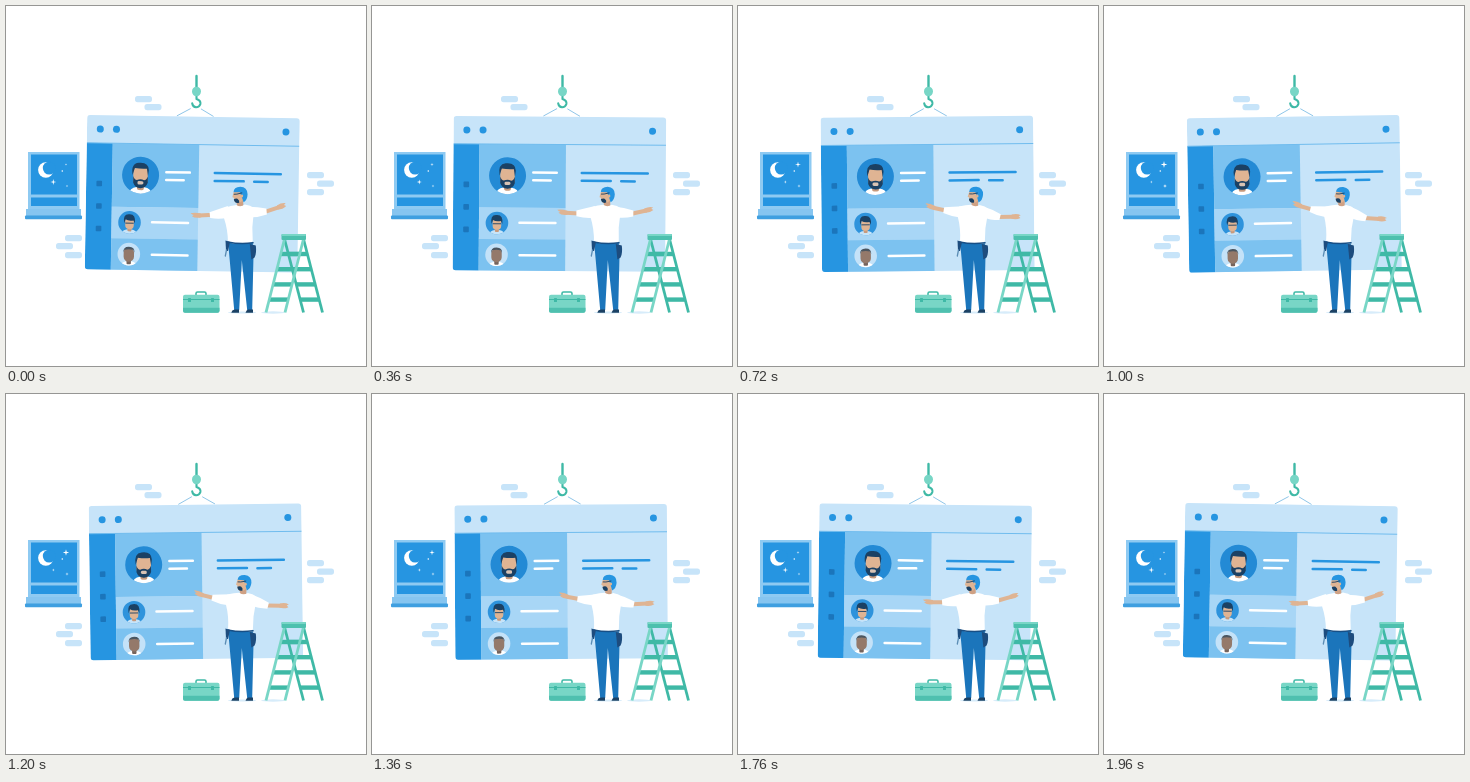
Write an HTML page with a canvas that moves like this. It is 360x360 px and loops after 2 s.

```html
<!DOCTYPE html>
<html lang="en">
<head>
<meta charset="utf-8">
<title>Building a page</title>
<style>
html, body { margin: 0; width: 100%; height: 100%; overflow: hidden; background: #fff; }
canvas { display: block; width: 360px; height: 360px; }
</style>
</head>
<body>
<canvas id="stage"></canvas>
<script>
const canvas = document.getElementById('stage');
const g = canvas.getContext('2d');
const dpr = window.devicePixelRatio || 1;
canvas.width = canvas.height = 360 * dpr;

const LOOP = 2000, STEP = 40, DEG = Math.PI / 180;
const PALE = '#c7e4f9', SKY = '#7cc2f0', SOFT = '#a8d6f6', BLUE = '#2695e1', DEEP = '#1b75bb',
  NAVY = '#1b4164', SKIN = '#dfb493', TEAL = '#3fb9a6', MINT = '#78d6c6', WHITE = '#fff';

function box(x, y, w, h, color, r = 0) {
  g.fillStyle = color;
  g.beginPath();
  g.roundRect(x, y, w, h, r);
  g.fill();
}

function oval(x, y, rx, color, ry = rx) {
  g.fillStyle = color;
  g.beginPath();
  g.ellipse(x, y, rx, ry, 0, 0, 7);
  g.fill();
}

function shape(path, color) {
  g.fillStyle = color;
  g.fill(new Path2D(path));
}

function stroke(path, color, width, cap = 'round') {
  g.strokeStyle = color;
  g.lineWidth = width;
  g.lineCap = cap;
  g.lineJoin = 'round';
  g.stroke(new Path2D(path));
}

function bar(x1, x2, y, color, width = 2.5) {
  stroke(`M${x1 + 1} ${y}H${x2 - 1}`, color, width);
}

function turned(x, y, deg, draw) {
  g.save();
  g.translate(x, y);
  g.rotate(deg * DEG);
  g.translate(-x, -y);
  draw();
  g.restore();
}

function inCircle(x, y, r, color, draw) {
  oval(x, y, r, color);
  g.save();
  g.beginPath();
  g.arc(x, y, r, 0, 7);
  g.clip();
  g.translate(x, y);
  draw();
  g.restore();
}

function bricks() {
  const spots = [[129, 90], [138.5, 98], [301, 166], [311, 174.5], [301, 183], [59, 229], [50, 237], [59, 246]];
  for (const [x, y] of spots) box(x, y, 17, 6.2, PALE, 2.6);
}

function star(x, y, r) {
  const k = r * 0.2;
  shape(`M${x} ${y - r}L${x + k} ${y - k}L${x + r} ${y}L${x + k} ${y + k}L${x} ${y + r}` +
    `L${x - k} ${y + k}L${x - r} ${y}L${x - k} ${y - k}Z`, WHITE);
}

function nightWindow(swing) {
  box(22, 146, 51.5, 58, '#8ecaf2');
  box(25, 148.5, 46, 40, BLUE);
  box(25, 191.5, 46, 8.5, BLUE);
  box(20, 203, 55, 7, '#86c5f0');
  box(19, 209.5, 57, 3.7, '#3f9fe0', 1);
  oval(39.8, 164, 7.7, WHITE);
  oval(43.2, 162.1, 6.4, BLUE);
  star(60, 158.5, 2.3 - 1.1 * swing);
  star(47.3, 176, 2.2 + 0.8 * swing);
  star(61, 180, 1.6 - 0.3 * swing);
  oval(56.3, 165, 0.8, WHITE);
}

function bearded() {
  shape('M-12 20Q-11 13 -4 12H4Q11 13 12 20Z', WHITE);
  box(-3.5, 7, 7, 8, '#c79a7d', 2);
  box(-7.3, -9.5, 14.6, 20, SKIN, 6);
  shape('M-7.3 1Q-6 4.8 -3.6 5Q0 3.4 3.6 5Q6 4.8 7.3 1V7.5Q5.5 13 0 13Q-5.5 13 -7.3 7.5Z', NAVY);
  box(-3, 6, 6, 3.4, '#d9c3b4', 1.5);
  shape('M-8 0Q-10 -11.5 -2 -12.3Q8 -13.5 8.2 -5L7.4 1L6.3 -6.5Q0 -6 -5.8 -7Z', NAVY);
}

function spectacled() {
  shape('M-8 12Q-7 7.5 -2 7H2Q7 7.5 8 12Z', PALE);
  box(-2, 4, 4, 5, '#c79a7d', 1);
  box(-4.3, -5, 8.6, 11.8, SKIN, 4);
  shape('M-5.4 1Q-7 -8 -1 -8Q6.5 -9 5.4 1L4 -2Q-1 -1 -4 -3Z', NAVY);
  stroke('M-3.8 .8H3.8', NAVY, 0.9);
}

function cropped() {
  shape('M-9 12Q-7 7.5 -2 7H2Q7 7.5 9 12Z', WHITE);
  box(-2.2, 3, 4.4, 7, '#75645d', 1);
  box(-5.2, -6.5, 10.4, 14, '#94796a', 5);
  shape('M-5.5 -1.5Q-6 -7.3 0 -7.3Q6 -7.3 5.5 -1.5L4.4 -4.4Q0 -5.4 -4.4 -4.4Z', '#4b5660');
}

function hook() {
  stroke('M190.5 70V82', TEAL, 2.4);
  stroke('M190.5 88V93Q194.9 94.3 194.4 98Q193.2 101.4 190 101.3Q186.8 101 186.2 97.3', TEAL, 2.1);
  oval(190.5, 85.5, 4.5, MINT, 4.8);
}

function board() {
  stroke('M172 110L185 102.8M196 103L208 110', '#83bfe6', 0.9);
  g.save();
  g.beginPath();
  g.roundRect(82, 110.7, 212.5, 154.3, 3);
  g.clip();
  box(82, 110, 213, 156, PALE);
  box(82, 138.5, 26, 127, BLUE);
  box(108, 138.5, 86.5, 63.5, SKY);
  box(108, 202, 86.5, 31.5, SOFT);
  box(108, 233.5, 86.5, 32, SKY);
  box(82, 138, 213, 1, '#70bcee');
  g.restore();

  for (const x of [95.3, 111.5, 281]) oval(x, 124.6, 3.5, BLUE);
  for (const y of [179, 201.5, 224]) box(92.3, y - 2.8, 5.6, 5.6, DEEP, 0.8);

  inCircle(136.3, 170, 18.5, '#238ad5', bearded);
  inCircle(126, 217.4, 11.3, '#2e93dc', spectacled);
  inCircle(125.8, 249.2, 11.3, '#c4e2f8', cropped);

  bar(161, 186.5, 166.7, WHITE);
  bar(161, 180.5, 174.5, WHITE);
  bar(147.5, 185.5, 217, WHITE);
  bar(147.8, 185.5, 249.5, WHITE);
  bar(209.5, 277.5, 166.8, BLUE);
  bar(209.5, 240.5, 174.6, BLUE);
  bar(249, 264.5, 174.9, BLUE);
}

function toolbox() {
  stroke('M190 289V287.5Q190 286 191.5 286H198.5Q200 286 200 287.5V289', TEAL, 1.6);
  box(177, 288.7, 36.5, 18, MINT, 2);
  box(177, 301.8, 36.5, 4.9, '#4fc0af', [0, 0, 2, 2]);
  box(177, 293, 36.5, 1, TEAL);
  for (const x of [182, 205]) box(x, 292, 3, 4, TEAL, 0.5);
}

// One side of the ladder: two parallel legs that lean by `lean` at the floor.
function ladderSide(lean, legColor, rungColor) {
  for (let y = 248; y < 300; y += 15.2) {
    const x = 278.5 + lean * (y - 233) / 73;
    box(x, y - 2.2, 19, 4.4, rungColor);
  }
  for (const x of [278.5, 297.5]) stroke(`M${x} 233L${x + lean} 306.5`, legColor, 2.8, 'butt');
}

function ladder() {
  oval(267, 306.5, 12, '#d7ecfa', 1.2);
  ladderSide(19, TEAL, TEAL);
  ladderSide(-18.5, MINT, TEAL);
  box(275.5, 228, 24.5, 6, '#4dc0ae', 1);
  box(275.5, 228, 24.5, 2, MINT, 1);
}

function legs() {
  oval(236, 306.5, 14, '#d7ecfa', 1);
  shape('M222 235H246.5L247.6 246L246.2 304H241.2L235.8 254L233.2 304H228.2Z', DEEP);
  shape('M225.3 306.8Q225.8 304 228.5 303.5H233V306.8ZM239.5 306.8Q240.5 304 242 303.5H247V306.8Z', NAVY);
}

function belt() {
  stroke('M221.8 236Q234 238.6 247 236.8', '#174f86', 1.6);
  shape('M243.8 238L249.8 239.5Q250.8 247 248.6 251.5L245.4 253.5Z', '#1d4c7e');
  shape('M219.5 234.5L224 236L222 245H220Z', '#1d4c7e');
  stroke('M220.5 244L219.3 250', '#5b8db5', 1.3);
}

function leftArm() {
  stroke('M208 206.6L194 205.4', SKIN, 4, 'butt');
  shape('M196 203.4Q190 201.2 186 202Q187.5 203.8 189 204.2L187 205Q190 208 196 207.4Z', SKIN);
  shape('M224 200Q213 202 205 203.6L204.8 209.4Q214 212 222 211.5Z', WHITE);
}

function rightArm() {
  stroke('M260 209L275 207', SKIN, 4, 'butt');
  shape('M273 205Q278 203 282 204.5L280 205.8L282 207.2Q278 210 273 209Z', SKIN);
  shape('M243 200.3Q253 202 262 206L261.4 212Q252 213.2 245 211.5Z', WHITE);
}

function head() {
  box(232.5, 192, 6.5, 9, '#cfa184', 2);
  shape('M230 185.5Q228.8 189 228.4 191L229.8 191.6Q229.8 197 233.2 197Q238 197 240 192V184H231Z', SKIN);
  shape('M229.8 186Q230 180.8 236.8 180.8Q243.8 181.5 243.7 188.5Q243.3 194.5 239.4 196.3Q238.4 193 237.6 190.5L236 186.3Z', BLUE);
  shape('M229.7 193Q231.5 192 233.4 192.6Q235.6 194 235 196.6Q230.5 198 229.7 193Z', NAVY);
  stroke('M230.3 188H233L238 187', NAVY, 0.9);
  oval(238, 190, 1.2, SKIN, 1.5);
}

function builder(swing) {
  legs();
  turned(235, 237, -2.5 * swing, () => {
    head();
    turned(219, 205, 1.5 - 7 * swing, leftArm);
    turned(247, 206, -8.7 * swing, rightArm);
    shape('M220 201Q227 199 232 198.8Q236 201.5 240.5 198.8Q246 199.5 250 203Q248 213 247 222L246.8 237Q234 239 222 236Q222.5 223 219 211Z', WHITE);
  });
  belt();
}

function draw(ms) {
  const t = Math.floor(ms % LOOP / STEP) * STEP;
  const swing = Math.cos(2 * Math.PI * t / LOOP);
  g.setTransform(dpr, 0, 0, dpr, 0, 0);
  g.fillStyle = WHITE;
  g.fillRect(0, 0, 360, 360);
  bricks();
  nightWindow(swing);
  turned(190, 60, 0.9 * swing, board);
  hook();
  toolbox();
  ladder();
  builder(swing);
}

const start = performance.now();
function tick() {
  draw(performance.now() - start);
  requestAnimationFrame(tick);
}
tick();
</script>
</body>
</html>
```
